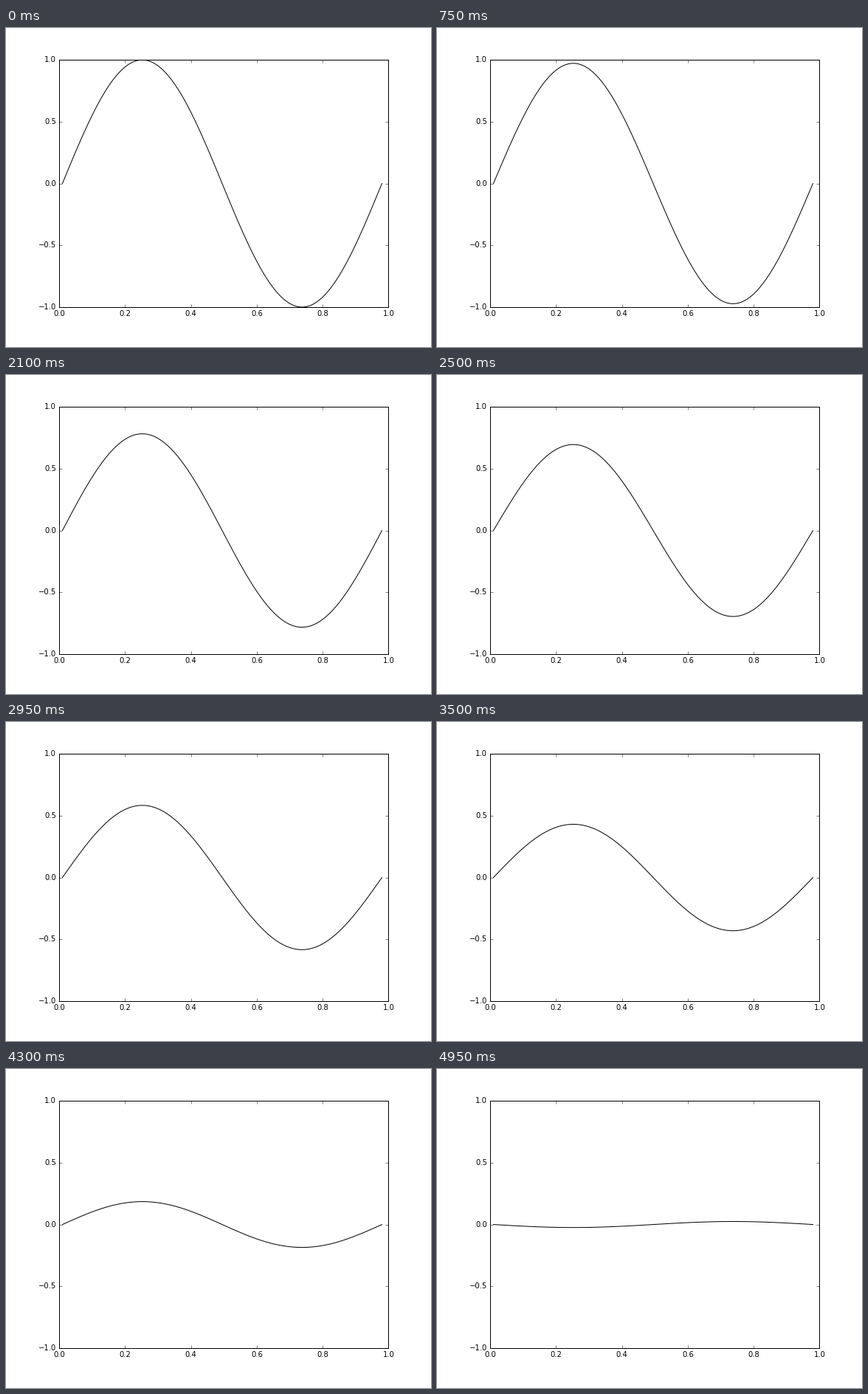
A matplotlib script for the animation above (5 s loop, 576 px wide and 432 px high).

```python
import numpy as np
import matplotlib.pyplot as plt
from matplotlib.animation import FuncAnimation

FRAMES, INTERVAL = 100, 50
DX, COURANT = 0.01, 0.25

plt.style.use("classic")
plt.rcParams.update({
    "font.family": "DejaVu Sans",
    "font.size": 10,
    "figure.dpi": 72,
    "savefig.dpi": 72,
    "figure.facecolor": "white",
    "figure.subplot.left": 0.125,
    "figure.subplot.right": 0.9,
    "figure.subplot.bottom": 0.125,
    "figure.subplot.top": 0.9,
})

# Standing wave on a string with fixed ends
x = np.arange(1, 99) * DX
phase = 2 * np.pi / (len(x) - 1)
shape = np.sin(phase * np.arange(len(x)))
omega = COURANT * phase

fig, ax = plt.subplots(figsize=(8, 6), dpi=72)
ax.set_xlim(0, 1)
ax.set_ylim(-1, 1)
ax.set_xticks(np.linspace(0, 1, 6))
ax.set_yticks(np.linspace(-1, 1, 5))
line, = ax.plot(x, shape, color="black", linewidth=1)


def update(i):
    # The string starts at rest, half a time step before the second frame
    amplitude = 1 if i < 3 else np.cos((i - 0.5) * omega)
    line.set_ydata(amplitude * shape)
    return line,


anim = FuncAnimation(fig, update, frames=FRAMES, interval=INTERVAL,
                     repeat=True, repeat_delay=0)
plt.show()
```
